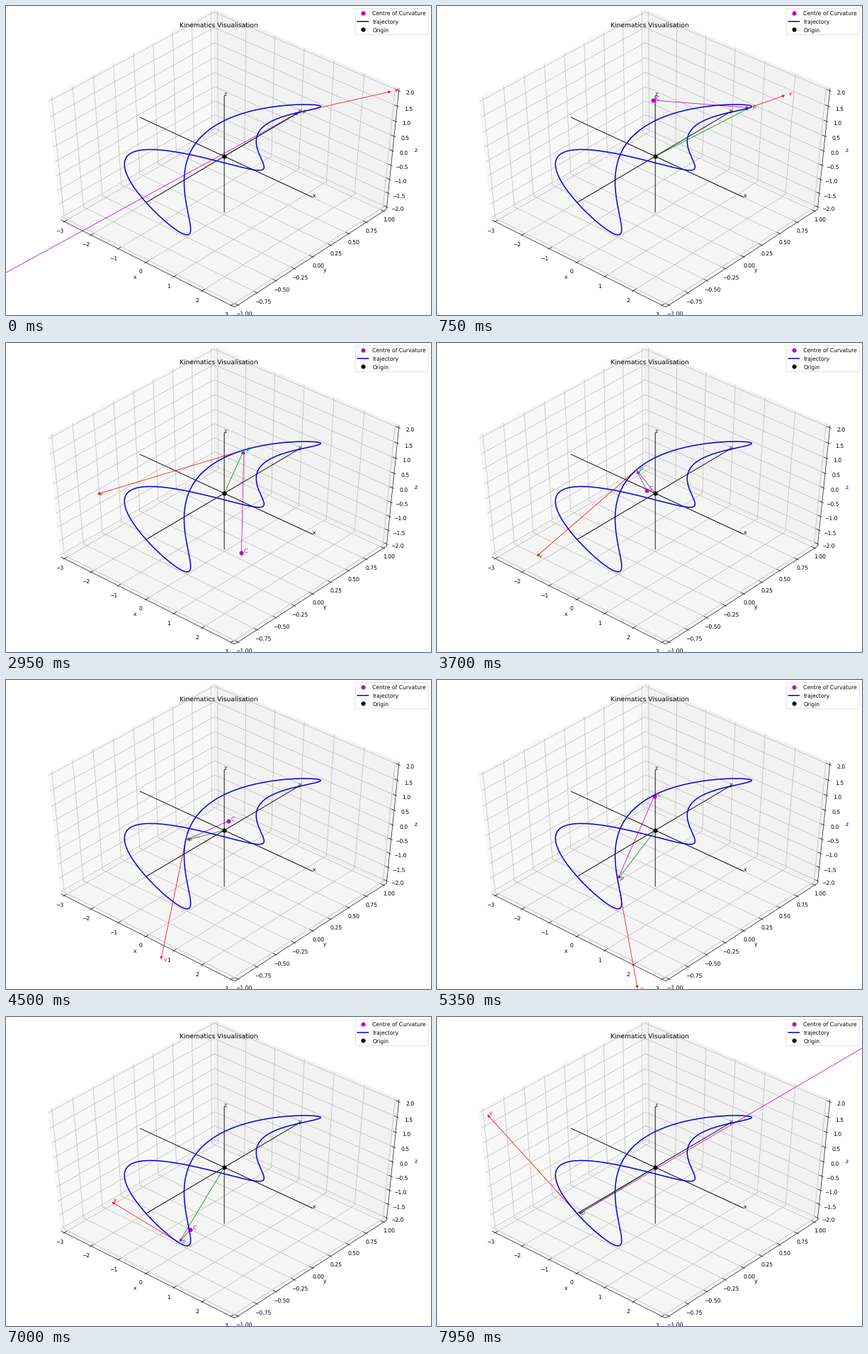
Recreate the animation shown at these times as a matplotlib script. Size 600x436 px, loop 8 s.

```python
import numpy as np
import matplotlib.pyplot as plt
from matplotlib.animation import FuncAnimation
from matplotlib.collections import LineCollection
from matplotlib.patches import FancyArrowPatch, Polygon

W, H, FRAMES = 600, 436, 160
K = 6 / 11  # an 11 inch wide layout shown on 6 inches

plt.rcParams.update({
    "font.family": "DejaVu Sans", "font.size": 10 * K,
    "lines.linewidth": 2 * K, "lines.markersize": 7 * K,
    "lines.markeredgewidth": K, "patch.linewidth": K,
    "text.hinting": "none", "path.snap": False,
})

# Camera: unit cube seen in perspective from distance 10
AZ, EL, DIST = np.radians(-48.5), np.radians(46), 10
TOWARD = np.array([np.cos(AZ) * np.cos(EL), np.sin(AZ) * np.cos(EL), np.sin(EL)])
RIGHT = np.array([-np.sin(AZ), np.cos(AZ), 0])
UP = np.cross(TOWARD, RIGHT)
SPAN = np.array([6, 2, 4])
CX, CY = W * 95 / 185, H * 90 / 185


def project_unit(p):
    """Cube coordinates (-0.5 to 0.5) to stage pixels."""
    p = np.asarray(p, float)
    depth = DIST - p @ TOWARD
    return np.stack([CX + W / 0.185 * (p @ RIGHT) / depth,
                     CY - H / 0.185 * (p @ UP) / depth], axis=-1)


def project(p):
    return project_unit(np.asarray(p, float) / SPAN)


def position(t):
    return np.stack([np.sin(3 * t), np.cos(t), np.sin(2 * t)], axis=-1)


def velocity(t):
    return np.array([3 * np.cos(3 * t), -np.sin(t), 2 * np.cos(2 * t)])


def acceleration(t):
    return np.array([-9 * np.sin(3 * t), -np.cos(t), -4 * np.sin(2 * t)])


def curvature_centre(t):
    v, a = velocity(t), acceleration(t)
    normal = a - v * (v @ a) / (v @ v)
    return position(t) + normal * (v @ v) / (normal @ normal)


fig = plt.figure(figsize=(W / 100, H / 100), dpi=100, facecolor="white")
ax = fig.add_axes([0, 0, 1, 1])
ax.set_xlim(0, W)
ax.set_ylim(H, 0)
ax.axis("off")

# Panes, slightly larger than the data box
E = 0.5 + 1 / 48
panes = [
    ([(-E, -E, -E), (-E, E, -E), (-E, E, E), (-E, -E, E)], 0.95),
    ([(-E, E, -E), (E, E, -E), (E, E, E), (-E, E, E)], 0.90),
    ([(-E, -E, -E), (E, -E, -E), (E, E, -E), (-E, E, -E)], 0.925),
]
for corners, grey in panes:
    ax.add_patch(Polygon(project_unit(corners), color=(grey,) * 3 + (0.5,), zorder=0.1))


def with_tick(axis, value, others):
    """Point with the given value on one axis and two others in order."""
    p = list(others)
    p.insert(axis, value)
    return p


# Per axis: name, ticks, format, sides of the edge, grid path, tick direction
axes3d = [
    ("x", np.arange(-3, 4), "{:.0f}", (-1, -1), [(-1, -1), (1, -1), (1, 1)], 0),
    ("y", np.arange(-4, 5) / 4, "{:.2f}", (1, -1), [(1, -1), (-1, -1), (-1, 1)], 0),
    ("z", np.arange(-4, 5) / 2, "{:.1f}", (1, 1), [(-1, -1), (-1, 1), (1, 1)], 0),
]
grid, black = [], []
for axis, (name, ticks, fmt, side, path, tick_dir) in enumerate(axes3d):
    side = np.array(side)
    black.append(project_unit([with_tick(axis, s, side * E) for s in (-E, E)]))
    for value in ticks:
        u = value / SPAN[axis]
        grid.append(project_unit([with_tick(axis, u, np.array(q) * E) for q in path]))
        ends = []
        for reach in (0.1 / 12, -0.2 / 12):
            edge = side * E
            edge[tick_dir] += side[tick_dir] * reach
            ends.append(with_tick(axis, u, edge))
        black.append(project_unit(ends))
        x, y = project_unit(with_tick(axis, u, side * (E + 0.0336)))
        ax.text(x, y + 0.7, fmt.format(value).replace("-", "\u2212"),
                ha="center", va="top", clip_on=True)
    x, y = project_unit(with_tick(axis, 0, side * (E + 0.0731)))
    ax.text(x, y, name, ha="center", va="center")

ax.add_collection(LineCollection(grid, colors="#b0b0b0", linewidths=0.8 * K, zorder=0.5))
ax.add_collection(LineCollection(black, colors="k", linewidths=0.8 * K, zorder=0.6))

# Coordinate axes through the origin
for name, tip in zip("xyz", np.diag(SPAN / 2)):
    ends = project([-tip, tip])
    ax.plot(*ends.T, color="k", lw=1.2 * K, zorder=1.5)
    ax.text(*ends[1], name)

centre_dot, = ax.plot([], [], "mo", label="Centre of Curvature")
curve = project(position(np.linspace(0, 2 * np.pi, 600)))
ax.plot(*curve.T, color="#0000e0", label="trajectory")
ax.plot(CX, CY, "ko", label="Origin")
ax.legend(loc="upper right")
fig.text(0.5, 0.92 + 5.3 / H, "Kinematics Visualisation",
         ha="center", va="baseline", fontsize=12 * K)


def make_arrow(color):
    arrow = FancyArrowPatch((0, 0), (1, 1), arrowstyle="-|>", mutation_scale=10 * K,
                            lw=K, color=color, shrinkA=2 * K, shrinkB=2 * K, zorder=1)
    return ax.add_patch(arrow)


def make_label(text, color, style="italic"):
    return ax.text(0, 0, text, color=color, style=style, clip_on=True)


p_arrow, v_arrow, c_arrow = map(make_arrow, "grm")
p_label = make_label("p", "g")
v_label = make_label("v", "r")
c_label = make_label("C", "m", "normal")


def update(i):
    t = (i + 0.5) * np.pi / FRAMES
    p = position(t)
    point, tip, centre = project([p, p + velocity(t), curvature_centre(t)])
    p_arrow.set_positions((CX, CY), point)
    v_arrow.set_positions(point, tip)
    c_arrow.set_positions(centre, point)
    centre_dot.set_data([centre[0]], [centre[1]])
    for label, at in ((p_label, point), (v_label, tip), (c_label, centre)):
        label.set_position((at[0] + 3.5, at[1] + 1))
    return p_arrow, v_arrow, c_arrow, centre_dot, p_label, v_label, c_label


anim = FuncAnimation(fig, update, frames=FRAMES, interval=50, repeat=True, repeat_delay=0)
plt.show()
```
